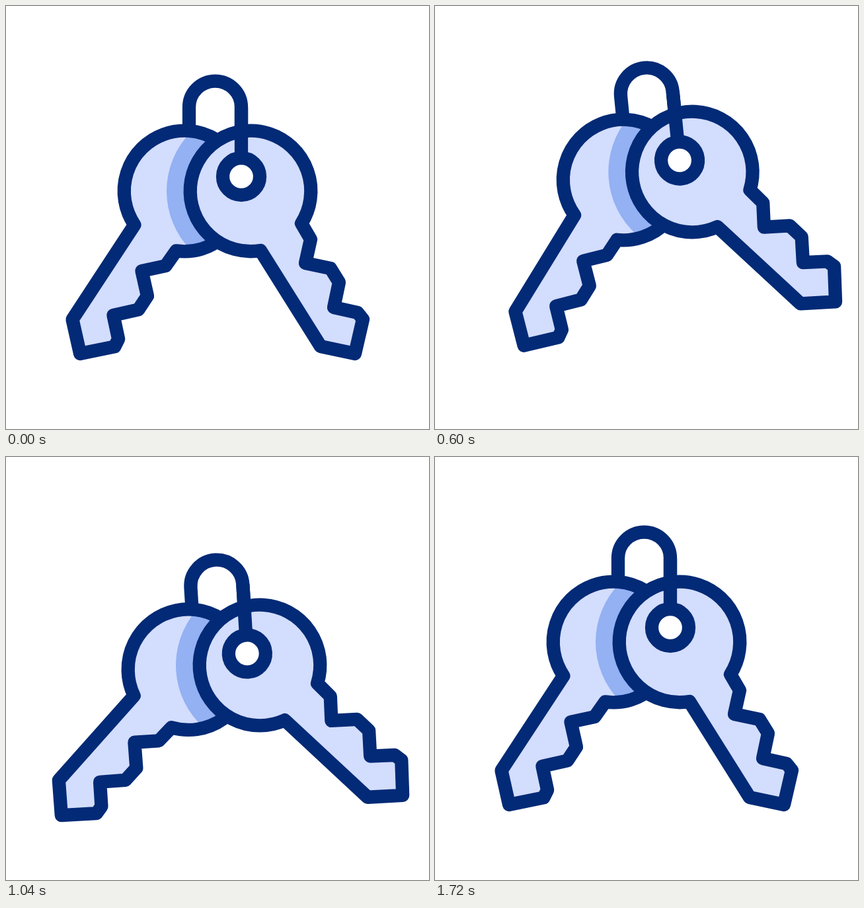
Recreate the animation shown at these times as an HTML page with a canvas. Size 640 px wide and 640 px high, loop 1.84 s.

```html
<!DOCTYPE html>
<html lang="en">
<head>
<meta charset="utf-8">
<title>Keys</title>
<style>
  html, body { margin: 0; width: 100%; height: 100%; overflow: hidden; background: #fff; }
  canvas { display: block; width: 100vmin; height: 100vmin; }
</style>
</head>
<body>
<canvas id="stage" width="640" height="640"></canvas>
<script>
const ctx = document.getElementById('stage').getContext('2d');
const NAVY = '#032a76', LIGHT = '#d3ddfd', SHADE = '#93b1f3';
const LOOP = 1840, STEP = 40;

// Pivots: where the ring hangs, and the hole of each key.
const HANG = [316, 114], LEFT_HOLE = [284, 258], RIGHT_HOLE = [356, 258];

// One key around the centre of its head; the left one is the same key turned.
const key = new Path2D(`M15 90 A91.3 91.3 0 1 1 77 49 l14 24 -8 36 38 8 13 21
  -8 38 36 8 8 10 -12 52 -52 -11Z`);
const leftKey = place(key, 270, 280, 65.4);
const rightKey = place(key, 370, 280, 0);
const ring = new Path2D('M277 215 V153 A39.5 39.5 0 0 1 356 153 V230');
const frontLeg = new Path2D('M356 153 V230');
const shade = disc(370, 280, 127);
const eyelet = disc(356, 258, 28);

// Swings between extremes; the keys lag a little behind the ring.
const drop = sway(120, [280, 280, 280, 280, 320], [0, 61, -33.5, 55, -33.5, 0]);
const swing = sway(160, [240], [0, 5.5, -6.1, 6.1, -6.1, 0]);
const lean = sway(200, [240], [0, 1.3, -3.8, 2.5, -2, 0]);
const spread = sway(280, [180, 380], [0, 11.7, -7.2, 11.7, -5.5, 0]);

function place(path, x, y, degrees) {
  const placed = new Path2D();
  placed.addPath(path, new DOMMatrix().translate(x, y).rotate(degrees));
  return placed;
}

function disc(x, y, r) {
  const path = new Path2D();
  path.arc(x, y, r, 0, Math.PI * 2);
  return path;
}

function ease(u) {
  return u * u * u * (u * (6 * u - 15) + 10);
}

// Eases from each value to the next; the gaps repeat in turn.
function sway(start, gaps, values) {
  return time => {
    let rest = time - start;
    if (rest <= 0) return values[0];
    for (let i = 0; i < values.length - 1; i++) {
      const gap = gaps[i % gaps.length];
      if (rest < gap) return values[i] + (values[i + 1] - values[i]) * ease(rest / gap);
      rest -= gap;
    }
    return values[values.length - 1];
  };
}

function turn([x, y], degrees) {
  ctx.translate(x, y);
  ctx.rotate(degrees * Math.PI / 180);
  ctx.translate(-x, -y);
}

function turned(pivot, degrees, paint) {
  ctx.save();
  turn(pivot, degrees);
  paint();
  ctx.restore();
}

function fill(path, color) {
  ctx.fillStyle = color;
  ctx.fill(path);
}

function draw(t) {
  const leftTurn = lean(t) + spread(t), rightTurn = lean(t) - spread(t);

  ctx.setTransform(1, 0, 0, 1, 0, 0);
  ctx.fillStyle = '#fff';
  ctx.fillRect(0, 0, 640, 640);
  ctx.strokeStyle = NAVY;
  ctx.lineWidth = 20.3;
  ctx.lineJoin = 'round';

  ctx.translate(0, drop(t));
  turn(HANG, swing(t));
  ctx.stroke(ring);

  turned(LEFT_HOLE, leftTurn, () => {
    fill(leftKey, LIGHT);
    ctx.clip(leftKey);
    // The shade follows the right key but stays inside the left one.
    turn(LEFT_HOLE, -leftTurn);
    turn(RIGHT_HOLE, rightTurn);
    fill(shade, SHADE);
  });
  turned(LEFT_HOLE, leftTurn, () => ctx.stroke(leftKey));

  turned(RIGHT_HOLE, rightTurn, () => {
    fill(rightKey, LIGHT);
    ctx.stroke(rightKey);
  });

  ctx.stroke(frontLeg);
  fill(eyelet, '#fff');
  ctx.stroke(eyelet);
}

const start = performance.now();
function tick() {
  const t = (performance.now() - start) % LOOP;
  draw(Math.floor(t / STEP) * STEP);
  requestAnimationFrame(tick);
}
tick();
</script>
</body>
</html>
```
